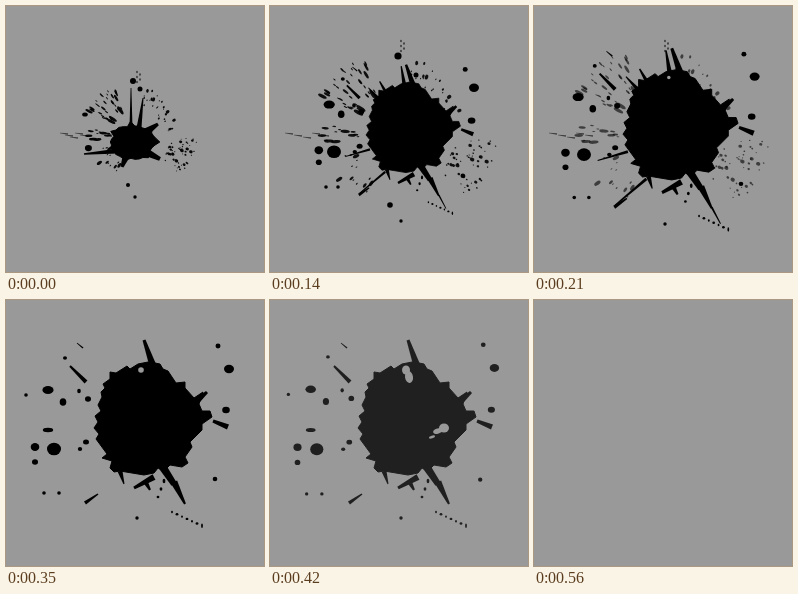
An HTML page with a canvas for the animation above (630 ms loop, 258 by 266 pixels).

```html
<!DOCTYPE html>
<html lang="en">
<head>
<meta charset="utf-8">
<title>Ink splat</title>
<style>
html, body { margin: 0; width: 100%; height: 100%; overflow: hidden; background: #999; }
canvas { display: block; width: 100vw; height: 100vh; }
</style>
</head>
<body>
<canvas id="stage" width="258" height="266"></canvas>
<script>
const ctx = document.getElementById('stage').getContext('2d');
const STEP = 70, STEPS = 9;
const PAPER = '#999';
const CX = 128, CY = 133;
// Everything flies out from one centre; 1 is the settled splat.
const SPREAD = [.57, .69, .8, .975, .99, 1, 1.015, 1.02];

const OUTLINE = [132,64, 142,62, 149,63, 154,64, 157,69, 162,71, 170,83, 179,82, 179,88, 188,98, 197,92,
  193,104, 196,111, 204,111, 206,117, 196,124, 196,130, 184,142, 186,147, 179,157, 182,163, 176,167,
  164,165, 158,171, 152,168, 148,173, 138,175, 114,171, 108,172, 104,168, 106,161, 96,158, 101,154,
  90,139, 93,134, 88,128, 92,122, 89,116, 95,111, 92,105, 96,97, 95,92, 99,88, 97,84, 104,79, 104,72,
  110,73, 121,66, 124,69];

// x, y, radii, first step
const DROPS = [
  [212,46, 2.5,2.4, 2], [223,69, 5,4.2, 2], [220,110, 3.8,3.2, 1], [209,179, 2.3,2.2, 2],
  [48,149, 7,6.3, 0], [29,147, 4.3,4, 1], [29,162, 3,2.8, 1], [42,90, 5.6,4, 0], [57,102, 3.3,3.8, 2],
  [38,193, 1.8,1.8, 1], [53,193, 1.8,1.8, 1], [20,95, 1.8,1.8, 4], [82,99, 3,2.8, 2], [80,142, 3,2.5, 2],
  [74,149, 2.2,1.9, 2], [42,130, 5.2,2.2, 4], [73,91, 1.8,2.2, 2], [59,58, 2,1.8, 2]
];

// Streaks: from x, y to x, y, width at each end
const ARMS = [
  [147,66, 138,40, 7,3], [156,166, 168,184, 8,6], [168,182, 179,204, 7,2], [148,177, 128,188, 6,3],
  [139,181, 144,190, 5,2], [114,171, 118,184, 5,1], [207,121, 222,127, 3,5.5], [190,102, 201,92, 6,3],
  [79,203, 92,194, 3.5,1.5], [64,66, 80,82, 2,4], [71,43, 77,48, .8,1.6]
];
// Short-lived streaks at the moment of impact
const SPLASH = [
  [113,75, 105,61, 4,1.5], [103,82, 91,69, 4,1], [93,146, 62,155, 3,1], [112,174, 80,201, 3,1.5],
  [136,66, 132,42, 5,1.5], [179,203, 188,220, 2,1]
];

// Angles from, to; distance from, to; count; stretch
const MIST = [[2, 44, 48, 94, 52, 1.2], [206, 244, 50, 92, 38, 3], [276, 304, 50, 76, 17, 1.5],
  [310, 350, 42, 62, 14, 1.3], [120, 165, 50, 80, 14, 2], [174, 188, 45, 82, 13, 3]];
const REACH = [.62, .83, 1, 1.09, 1.13];
const FADE = [.95, .95, .9, .6, .2];

function seeded(seed) {
  return () => {
    seed = (seed * 16807) % 2147483647;
    return seed / 2147483647;
  };
}

const rnd = seeded(4127);
const specks = MIST.flatMap(([a, b, near, far, count, stretch]) =>
  Array.from({ length: count }, () => ({
    angle: (a + (b - a) * rnd()) * Math.PI / 180,
    dist: near + (far - near) * rnd(),
    r: .5 + 1.4 * rnd() ** 2,
    stretch
  })));

// Uneven ring of points around an ellipse, every fifth one a spike.
function ragged(x, y, rx, ry, count) {
  return Array.from({ length: count }, (_, i) => {
    const a = i / count * Math.PI * 2;
    const k = .92 + .16 * rnd() + (i % 5 ? 0 : .16);
    return [x + Math.cos(a) * rx * k, y + Math.sin(a) * ry * k];
  }).flat();
}
const IMPACT = ragged(127, 136, 22, 17, 34);

function trace(p) {
  ctx.beginPath();
  for (let i = 0; i < p.length; i += 2) ctx.lineTo(p[i], p[i + 1]);
  ctx.closePath();
}

function blob(p) {
  trace(p);
  ctx.fill();
  ctx.lineJoin = 'round';
  ctx.stroke();
}

function oval(x, y, rx, ry = rx, tilt = 0) {
  ctx.beginPath();
  ctx.ellipse(x, y, rx, ry, tilt, 0, Math.PI * 2);
  ctx.fill();
}

// A streak whose width runs from w to v.
function taper(x, y, u, z, w, v) {
  const len = Math.hypot(u - x, z - y);
  const nx = (y - z) / len / 2, ny = (u - x) / len / 2;
  trace([x + nx * w, y + ny * w, u + nx * v, z + ny * v, u - nx * v, z - ny * v, x - nx * w, y - ny * w]);
  ctx.fill();
}

function mist(step) {
  if (step >= REACH.length) return;
  ctx.globalAlpha = FADE[step];
  const size = step ? 1 : .85;
  for (const s of specks) {
    const d = s.dist * REACH[step];
    oval(133 + Math.cos(s.angle) * d, 130 + Math.sin(s.angle) * d, s.r * s.stretch * size, s.r * size, s.angle);
  }
  ctx.globalAlpha = 1;
}

// Fine sprays thrown straight up and to the left.
function spray(step) {
  if (step > 3) return;
  const grow = Math.min(step / 2, 1);
  ctx.globalAlpha = .6;
  for (let i = 0; i < 5; i++) {
    const x = 54 - 39 * grow + i * (5 + 4 * grow);
    const y = 127 + (i % 3) * 2;
    taper(x, y, x + 8, y + 1, .7, 1.3);
    oval(131 + (i % 2) * 3, 66 - 31 * grow + i * 2.5, .9, 1.2);
  }
  ctx.globalAlpha = 1;
}

function drops(step) {
  const k = SPREAD[step];
  const size = step < 2 ? .5 + step * .25 : step < 6 ? 1 : .94;
  for (const [x, y, rx, ry, first] of DROPS) {
    if (step >= first) oval(CX + (x - CX) * k, CY + (y - CY) * k, rx * size, ry * size);
  }
  // Drops falling below and rising above
  const fall = Math.min(step / 2, 1);
  oval(129 + 2 * fall, 191 + 24 * fall + (step > 2 ? 3 : 0), 1.7);
  if (step < 3) {
    oval(122 - 2 * fall, 179 + 20 * fall, 2 + .8 * fall);
    oval(127 + fall, 75 - 25 * fall, 3 + .6 * fall);
    oval(134 + 12 * fall, 83 - 14 * fall, 2.5);
  }
}

// Dots flung off the end of the long lower streak
function trail() {
  for (let i = 0; i < 7; i++) oval(166 + i * 5, 212 + i * 2.3, i % 2 ? 1.4 : .9, i === 6 ? 2.2 : 1.2);
  for (let i = 0; i < 3; i++) oval(152 + i * 3, 197 - i * 8, 1.4, 1.3 + i * .5);
}

function hole(x, y, rx, ry, tilt) {
  ctx.fillStyle = PAPER;
  oval(x, y, rx, ry, tilt);
}

function holes(step) {
  if (step < 6) {
    const r = step === 3 ? 1.8 : 2.8;
    hole(135, 70, r, r);
    return;
  }
  const g = step === 6 ? 1 : 1.5;
  hole(136, 70, 4 * g, 4.5 * g);
  hole(139, 77, 4 * g, 6 * g, -.15);
  hole(174, 128, 5 * g, 4.5 * g);
  hole(168, 131, 5 * g, 2.5 * g, -.3);
  hole(162, 137, 3.2 * g, 1.4 * g, -.3);
}

function splat(step) {
  const k = step > 3 ? 1 : SPREAD[step];
  ctx.save();
  ctx.translate(CX, CY);
  ctx.scale(k, k);
  ctx.translate(-CX, -CY);
  blob(OUTLINE);
  for (const arm of ARMS) taper(...arm);
  if (step < 4) for (const streak of SPLASH) taper(...streak);
  if (step > 1) trail();
  if (step > 2) holes(step);
  ctx.restore();
}

function impact() {
  blob(IMPACT);
  taper(112, 145, 78, 148, 5, 1.5);
  taper(125, 122, 125, 82, 3, .8);
  taper(133, 122, 137, 92, 5, 1);
  taper(140, 126, 152, 118, 8, 3);
  taper(140, 146, 154, 153, 8, 4);
  taper(121, 148, 116, 161, 8, 3);
}

function draw(step) {
  ctx.fillStyle = PAPER;
  ctx.fillRect(0, 0, 258, 266);
  if (step >= SPREAD.length) return;
  ctx.fillStyle = ctx.strokeStyle = step < 6 ? '#000' : step === 6 ? '#202020' : '#5d5d5d';
  mist(step);
  spray(step);
  drops(step);
  if (step) splat(step);
  else impact();
}

function tick() {
  draw(Math.floor(performance.now() / STEP) % STEPS);
  requestAnimationFrame(tick);
}
tick();
</script>
</body>
</html>
```
